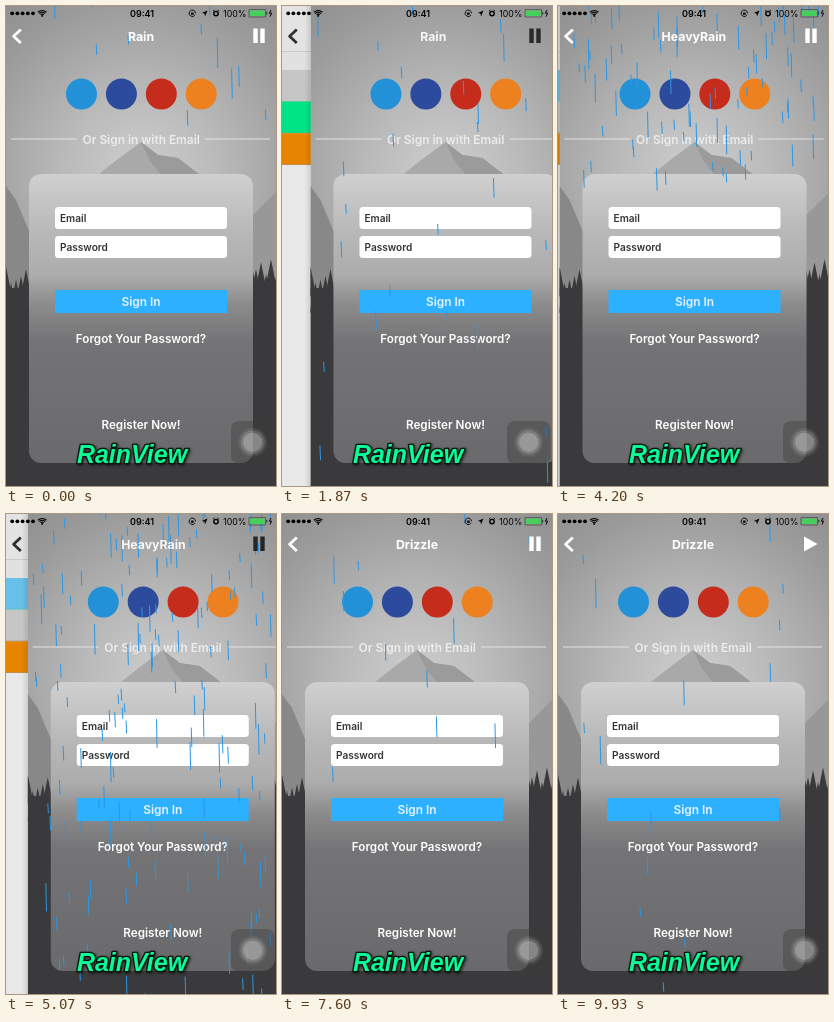
Recreate the animation shown at these times as an HTML page with a canvas. Size 270x480 px, loop 9.99 s.

```html
<!DOCTYPE html>
<html lang="en">
<head>
<meta charset="utf-8">
<title>RainView Demo</title>
<style>
  html, body { margin: 0; width: 100%; height: 100%; overflow: hidden; background: #fff; }
  canvas { display: block; width: 270px; height: 480px; }
</style>
</head>
<body>
<canvas id="stage"></canvas>
<script>
const W = 270, H = 480, LOOP = 9990, FPS = 15;
const canvas = document.getElementById('stage');
const ctx = canvas.getContext('2d');
const ratio = window.devicePixelRatio || 1;
canvas.width = W * ratio;
canvas.height = H * ratio;

const UI = 'Inter, Roboto, sans-serif';
const WHITE = '#fff', BLACK = '#000';
const ROWS = [['Rain', '#72d3ff'], ['HeavyRain', '#00fa92'], ['Drizzle', '#ff9200']];
const ROW_H = 31.6;

// Times in ms, rate in drops per second.
const SCENES = [
  { row: 0, tap: -9000, push: -9000, pop: 1809, rain: -380, rate: 27 },
  { row: 1, tap: 3325, push: 3390, pop: 5018, rain: 3700, rate: 160 },
  { row: 2, tap: 6395, push: 6470, pop: Infinity, rain: 6900, rate: 16 }
];
const PAUSE_AT = 9780;
const SPEED = 250, GRAVITY = 500, LIFE = 1100;

const clamp = v => Math.max(0, Math.min(1, v));
const rnd = n => { const v = Math.sin(n * 127.1 + 11.7) * 43758.5453; return v - Math.floor(v); };

// Critically damped spring from 0 to 1.
function spring(ms) {
  const x = Math.max(0, ms) * 0.009;
  return x > 9 ? 1 : 1 - (1 + x) * Math.exp(-x);
}

function rect(x, y, w, h, color) {
  ctx.fillStyle = color;
  ctx.fillRect(x, y, w, h);
}

function round(x, y, w, h, r, color) {
  ctx.fillStyle = color;
  ctx.beginPath();
  ctx.roundRect(x, y, w, h, r);
  ctx.fill();
}

function disc(x, y, r, color) {
  ctx.fillStyle = color;
  ctx.beginPath();
  ctx.arc(x, y, r, 0, Math.PI * 2);
  ctx.fill();
}

function arc(x, y, r, from, to, color, width) {
  ctx.strokeStyle = color;
  ctx.lineWidth = width;
  ctx.beginPath();
  ctx.arc(x, y, r, from, to);
  ctx.stroke();
}

function poly(points, color) {
  ctx.fillStyle = color;
  ctx.beginPath();
  points.forEach(([x, y]) => ctx.lineTo(x, y));
  ctx.closePath();
  ctx.fill();
}

function line(points, color, width) {
  ctx.strokeStyle = color;
  ctx.lineWidth = width;
  ctx.beginPath();
  points.forEach(([x, y]) => ctx.lineTo(x, y));
  ctx.stroke();
}

function text(str, x, y, size, weight, color, align = 'left') {
  ctx.font = `${weight} ${size}px ${UI}`;
  ctx.textAlign = align;
  ctx.fillStyle = color;
  ctx.fillText(str, x, y);
}

function blend(gradient, stops) {
  stops.forEach(([at, color]) => gradient.addColorStop(at, color));
  return gradient;
}

function drawTrees(from, to, top, seed) {
  for (let x = from; x <= to; x += 5) {
    const tip = top + rnd(seed + x) * 18;
    poly([[x - 6, tip + 30], [x, tip], [x + 6, tip + 30]], '#3a3a3c');
  }
}

function drawLandscape() {
  rect(0, 0, W, H, blend(ctx.createRadialGradient(135, 165, 0, 135, 165, 230),
    [[0, '#cecece'], [0.33, '#bababa'], [0.74, '#9b9b9b'], [1, '#8c8c8c']]));
  poly([[88, 172], [112, 153], [135, 136], [152, 149], [172, 152], [198, 172]], '#a9a9a9');
  poly([[135, 136], [152, 149], [172, 152], [198, 172], [158, 172], [144, 155]], '#9b9b9b');
  poly([[0, 180], [10, 194], [26, 232], [26, 290], [0, 290]], '#888');
  poly([[270, 186], [244, 212], [244, 290], [270, 290]], '#989898');
  drawTrees(0, 25, 259, 3);
  drawTrees(245, 270, 253, 40);
  rect(0, 282, W, H - 282, '#3a3a3c');
}

function drawForm() {
  ['#2391d8', '#2d4b9c', '#c52c1c', '#ed8120'].forEach((c, i) => disc(75.5 + i * 39.9, 88, 15.5, c));
  rect(5, 132.5, 66, 1, '#e4e4e4');
  rect(199, 132.5, 65, 1, '#e4e4e4');
  text('Or Sign in with Email', 135.2, 137.5, 11.9, 600, '#ececec', 'center');

  round(23, 168, 224, 289, 12, blend(ctx.createLinearGradient(0, 168, 0, 457),
    [[0, '#d0d0d0'], [0.2, '#b8b8b8'], [0.35, '#acacac'], [0.45, '#8c8c8d'], [0.58, '#747375'], [1, '#6a696b']]));
  [['Email', 201], ['Password', 230]].forEach(([label, y]) => {
    round(49, y, 172, 22, 3.5, WHITE);
    text(label, 54, y + 14.5, 10.1, 600, '#333');
  });
  rect(49, 284, 172, 23, '#2cb0ff');
  text('Sign In', 135, 300, 11.9, 600, '#e4f3ff', 'center');
  text('Forgot Your Password?', 135, 337, 11.7, 600, WHITE, 'center');
  text('Register Now!', 135, 422.5, 11.7, 600, WHITE, 'center');
}

function drawRain({ row, rain, rate }, t) {
  const gap = 1000 / rate;
  const first = Math.max(0, Math.floor((t - LIFE - rain) / gap));
  const end = Math.min(t, PAUSE_AT);
  for (let i = first; rain + i * gap < end; i++) {
    const seed = row * 1000 + i * 3;
    const age = (t - rain - (i + rnd(seed)) * gap) / 1000;
    if (age < 0) continue;
    const x = 4 + rnd(seed + 1) * 259;
    const y = SPEED * age + GRAVITY * age * age / 2;
    const length = 9 + rnd(seed + 2) ** 2 * 22;
    line([[x - 0.3, y - length], [x + 0.3, y]], '#2b97e6', 1);
  }
}

function drawList(scene, t) {
  rect(0, 0, W, H, WHITE);
  rect(0, 0, W, 46, '#f9f9f9');
  rect(0, 45.6, W, 0.6, '#b2b2b2');
  rect(0, 46, W, 18, '#f7f7f7');
  text('Examples', 12, 58.7, 10, 700, '#2a2a2c');
  const picked = t < scene.tap ? 0 : 1 - clamp((t - scene.pop - 400) / 780);
  ROWS.forEach(([name, color], i) => {
    const y = 64 + i * ROW_H;
    rect(0, y, W, ROW_H, color);
    if (i === scene.row) rect(0, y, W, ROW_H, `rgba(217,217,217,${picked})`);
    rect(0, y + 31.1, W, 0.5, 'rgba(130,130,135,.6)');
    text(name, 12, y + 20, 11.9, 500, BLACK);
  });
}

function drawNav(scene, t, out) {
  const ink = t >= scene.pop ? '#1c1c1c' : WHITE;
  ctx.globalAlpha = clamp(out * 1.5 - 0.5);
  text('RainView Demo', 135 - 95 * (1 - out), 34.5, 12.4, 600, BLACK, 'center');
  ctx.globalAlpha = 1 - out;
  text(ROWS[scene.row][0], 135 + 154 * out, 34.5, 12.3, 700, WHITE, 'center');
  line([[14.8, 23.5], [7.6, 30.2], [14.8, 37]], ink, 2.8);
  if (t >= PAUSE_AT) {
    poly([[246, 22.5], [259.5, 30], [246, 37.5]], ink);
  } else {
    rect(247.3, 22.5, 4.4, 14.5, ink);
    rect(254.3, 22.5, 4.4, 14.5, ink);
  }
  ctx.globalAlpha = 1;
}

function drawStatus() {
  const full = Math.PI * 2;
  for (let i = 0; i < 5; i++) disc(6.2 + i * 5.2, 7.3, 1.9, BLACK);
  for (let r = 2.2; r < 7; r += 1.9) arc(36.2, 10.5, r, -Math.PI * 0.75, -Math.PI * 0.25, BLACK, 1.1);
  disc(36.2, 9.9, 0.9, BLACK);
  text('09:41', 136, 10.6, 9, 600, BLACK, 'center');

  arc(186.3, 7.3, 3.2, 0.5, full, BLACK, 0.9);
  rect(185, 6.6, 2.7, 2.1, BLACK);
  poly([[201.5, 4.6], [199, 10.4], [198.5, 7.6], [195.7, 7.1]], BLACK);
  arc(210, 7.6, 2.2, 0, full, BLACK, 1.4);
  line([[207, 5.2], [208.4, 4]], BLACK, 1);
  line([[211.6, 4], [213, 5.2]], BLACK, 1);
  text('100%', 240.5, 10.6, 8.8, 400, BLACK, 'right');

  ctx.strokeStyle = '#333';
  ctx.lineWidth = 0.6;
  ctx.strokeRect(243, 3.6, 16.6, 7.4);
  rect(244, 4.6, 14.6, 5.4, '#45d05c');
  rect(260.2, 6, 1, 2.6, '#333');
  line([[265, 4], [263.4, 7.2], [265.6, 7.2], [264, 10.6]], BLACK, 1);
}

function drawOverlay() {
  round(225, 415, 43.5, 43, 8, 'rgba(58,58,60,.38)');
  [14.3, 12, 9.6].forEach((r, i) => disc(246.7, 436.3, r, `rgba(255,255,255,${0.08 + i * 0.07})`));

  ctx.font = 'italic bold 25px "Liberation Sans", Arial, sans-serif';
  ctx.textAlign = 'center';
  ctx.save();
  ctx.shadowColor = 'rgba(0,0,0,.7)';
  ctx.shadowBlur = 3 * ratio;
  ctx.shadowOffsetX = ctx.shadowOffsetY = ratio;
  ctx.strokeStyle = '#06170f';
  ctx.lineWidth = 2.6;
  ctx.strokeText('RainView', 126, 457.4);
  ctx.restore();
  ctx.fillStyle = '#0bfb98';
  ctx.fillText('RainView', 126, 457.4);
}

function draw(t) {
  const scene = SCENES.filter(s => t >= s.tap).pop();
  const out = t >= scene.pop ? spring(t - scene.pop) : 1 - spring(t - scene.push);
  const left = W * out;
  ctx.setTransform(ratio, 0, 0, ratio, 0, 0);
  ctx.lineJoin = 'round';

  if (out > 0) {
    ctx.save();
    ctx.translate(-0.3 * (W - left), 0);
    drawList(scene, t);
    ctx.restore();
    rect(0, 0, W, H, `rgba(0,0,0,${0.1 * (1 - out)})`);
  }
  if (out < 1) {
    rect(left - 6, 0, 6, H, blend(ctx.createLinearGradient(left - 6, 0, left, 0),
      [[0, 'rgba(0,0,0,0)'], [1, `rgba(0,0,0,${0.12 * (1 - out)})`]]));
    ctx.save();
    ctx.translate(left, 0);
    ctx.beginPath();
    ctx.rect(0, 0, W, H);
    ctx.clip();
    drawLandscape();
    drawForm();
    drawRain(scene, t);
    ctx.restore();
  }
  drawNav(scene, t, out);
  drawStatus();
  drawOverlay();
}

// Time advances 15 steps a second, rounded to 10 ms.
function tick() {
  const now = performance.now() % LOOP;
  const step = Math.floor((now + 3.4) * FPS / 1000);
  draw(Math.round(step * 100 / FPS) * 10);
  requestAnimationFrame(tick);
}
tick();
</script>
</body>
</html>
```
